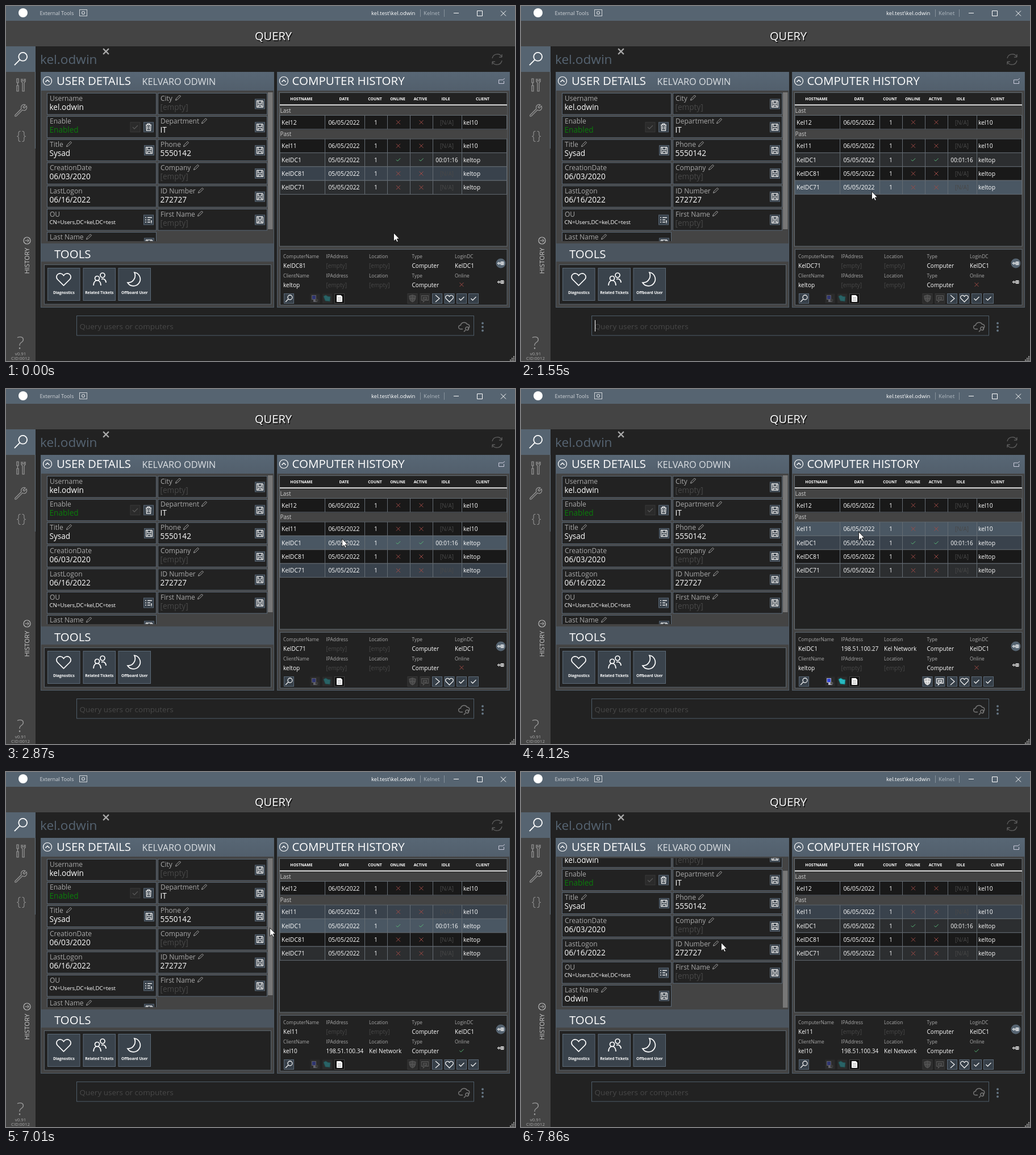
These frames come from a looping animation (896 px wide and 625 px high, 8000 ms). An HTML page:

```html
<!DOCTYPE html>
<html lang="en">
<head>
<meta charset="utf-8">
<title>Query console</title>
<style>
  html, body { margin: 0; width: 100%; height: 100%; overflow: hidden; background: #222; }
  svg { display: block; font-family: "Open Sans", "Noto Sans", sans-serif; white-space: pre; }
</style>
</head>
<body>
<svg id="stage" width="896" height="625" viewBox="0 0 896 625">
  <defs>
    <linearGradient id="head" x2="0" y2="1"><stop stop-color="#586775"/><stop offset="1" stop-color="#525f6c"/></linearGradient>
    <clipPath id="fieldClip"><path d="M62 151.5H471V414H62Z"/></clipPath>
  </defs>
  <g id="base"></g><g id="live"></g>
</svg>
<script>
const LOOP = 8000;
const STEEL = '#566471', EDGE = '#5b6977', GREY = '#444', DARK = '#222', DIM = '#484848', LABEL = '#a9a9a9';
const RED = '#a04a45', GREEN = '#58b877';

// Timelines: [start ms, value...]
const cursorKeys = [[0, 682, 399], [500, 659, 371], [640, 638, 346], [760, 624, 329], [910, 620, 328], [1030, 618, 327],
  [1150, 617, 326], [1990, 614, 320], [2130, 604, 298], [2250, 594, 272], [2370, 591, 263], [4000, 593, 256],
  [4120, 594, 251], [4270, 594, 249], [6890, 520, 262], [7010, 464, 274], [7160, 420, 284], [7290, 375, 290],
  [7440, 352, 293], [7710, 352, 300]];
const hoverKeys = [[0, -1], [910, 4], [2130, 3], [2250, 2], [4000, 1], [6890, 2], [7160, -1]];
const selectKeys = [[0, 3], [1550, 4], [3480, 2], [5350, 1]];
const scrollKeys = [[0, 0], [7440, 12], [7570, 23]];
const caretFlips = [1550, 1840, 2370, 2870, 3480, 3730, 4270, 4640, 5350, 5780, 6340, 6740, 7160, 7860];
const at = (keys, t) => keys.filter(k => k[0] <= t).pop().slice(1);

const rect = (x, y, w, h, fill, stroke = 'none') =>
  `<rect x="${x}" y="${y}" width="${w}" height="${h}" fill="${fill}" stroke="${stroke}"/>`;
const text = (x, y, size, str, fill = '#fff', extra = '') =>
  `<text x="${x}" y="${y}" font-size="${size}" fill="${fill}" ${extra}>${str}</text>`;
const line = (d, stroke, width = 1, fill = 'none') =>
  `<path d="${d}" stroke="${stroke}" stroke-width="${width}" fill="${fill}"/>`;
const circle = (x, y, r, fill, stroke = 'none') =>
  `<circle cx="${x}" cy="${y}" r="${r}" fill="${fill}" stroke="${stroke}" stroke-width="1.2"/>`;
const MID = 'text-anchor="middle"', BOLD = MID + ' font-weight="700"', MEDIUM = 'font-weight="500"';

// Icons are drawn around their centre.
const shapes = {
  heart: 'M0 6L-6 0C-9 -4 -3 -8 0 -3.5C3 -8 9 -4 6 0Z',
  check: 'M-4.5 0L-1.5 3L4.5 -3',
  cross: 'M-3.5 -3.5L3.5 3.5M3.5 -3.5L-3.5 3.5',
  search: 'M-.8 .8L-6 6M-2 -2a4 4 0 1 1 8 0a4 4 0 1 1 -8 0',
  save: 'M-5.5 -5.5H4.5L5.5 -4.5V5.5H-5.5ZM-3 -5V-1H3V-5M-3 5V2H3V5',
  trash: 'M-5 -4H5M-2 -4V-6H2V-4M-4 -4L-3.5 6H3.5L4 -4M-1.5 -2V4M1.5 -2V4',
  list: 'M-6 -4H-4M-2 -4H6M-6 0H-4M-2 0H3M-6 4H-4M-2 4H3M4 2H6M5 1V6',
  pencil: 'M-4.5 4.5L-3.5 1.5L2.5 -4.5L4.5 -2.5L-1.5 3.5Z',
  wrench: 'M-10 8L1 -3C-1 -9 5 -12 8 -10L4 -6L6 -4L10 -8C12 -3 8 2 3 -1L-8 10Q-11 11 -10 8Z',
  tools: 'M-6 -11V-4H-3V-11ZM-4.5 -4V1M-6 1V11H-3V1ZM2 -11V-6L4 -4V11H7V-4L9 -6V-11M4 -11V-7H7V-11',
  prompt: 'M-3 -6L4 0L-3 6',
  shield: 'M0 -6L5.5 -4.5C5.5 2 3 5 0 6C-3 5 -5.5 2 -5.5 -4.5ZM0 -6V6M-5 0H5',
  chat: 'M-6 -5H6V3H0L-3 6V3H-6ZM-3 -2H3V1H-3Z',
  moon: 'M0 -12A12 12 0 1 1 -12 6A12.5 12.5 0 0 0 0 -12Z',
  people: 'M-10 11C-10 -1 3 -1 3 11M-7.5 -1.5a4 4 0 1 1 8 0a4 4 0 1 1 -8 0M2 -7a4 4 0 1 1 8 0a4 4 0 1 1 -8 0M4 0C9 -2 12 2 12 6',
  up: 'M-4 2L0 -2L4 2',
  cloud: 'M-2 5H-6C-11 5 -11 -2 -6 -2C-5 -8 4 -9 6 -4C12 -4 11 4 7 4M3 7L0 10M3 4a3 3 0 1 1 6 0a3 3 0 1 1 -6 0',
  server: 'M-6 0L-3 -2V2ZM-3 0H0M0 -2.5H5V2.5H0ZM0 0H5M2.5 -2.5V2.5'
};
const icon = (name, x, y, color = '#ddd', width = 1, scale = 1, fill = 'none') =>
  `<g transform="translate(${x} ${y}) scale(${scale})">${line(shapes[name], color, width / scale, fill)}</g>`;
const button = (name, x, y, on = true, scale = 1, fill = 'none') =>
  rect(x - 8.5, y - 8.5, 17, 17, on ? '#363f48' : '#2b2b2b', on ? EDGE : '#393939') +
  icon(name, x, y, on ? '#eee' : '#555', 1.3, scale, fill);
const mark = (ok, x, y) => icon(ok ? 'check' : 'cross', x, y, ok ? GREEN : RED, 1, ok ? .8 : 1);

// label, value, pencil x (0 for none), button
const fields = [
  [['Username', 'kel.odwin', 0], ['Enable', 'Enabled', 0, 'trash'], ['Title', 'Sysad', 111, 'save'],
    ['CreationDate', '06/03/2020', 0], ['LastLogon', '06/16/2022', 0],
    ['OU', 'CN=Users,DC=kel,DC=test', 0, 'list'], ['Last Name', 'Odwin', 146, 'save']],
  [['City', '[empty]', 303, 'save'], ['Department', 'IT', 349, 'save'], ['Phone', '5550142', 317, 'save'],
    ['Company', '[empty]', 335, 'save'], ['ID Number', '272727', 343, 'save'], ['First Name', '[empty]', 342, 'save']]
];
const rows = [
  ['Kel12', '06/05/2022', 'kel10', 192.5], ['Kel11', '06/05/2022', 'kel10', 234], ['KelDC1', '05/05/2022', 'keltop', 258.4],
  ['KelDC81', '05/05/2022', 'keltop', 282.8], ['KelDC71', '05/05/2022', 'keltop', 307.2]
];

function fieldBox([label, value, pencil, action], col, i) {
  const x = 72.5 + col * 195, y = 153.5 + i * 40.8;
  const size = value.startsWith('CN') ? 9.7 : 13.6;
  const color = value === '[empty]' ? DIM : value === 'Enabled' ? '#0a7d0a' : '#fff';
  const actionX = action === 'save' ? (col ? 447 : 252) : 251;
  return rect(x, y, 192, 37.5, DARK, EDGE) + text(x + 4.5, y + 13, 12, label, LABEL) +
    text(x + 4, y + (size < 10 ? 26 : 29), size, value, color) +
    (pencil ? icon('pencil', pencil, y + 8, LABEL) : '') +
    (label === 'Enable' ? button('check', 227.5, y + 19, false) : '') +
    (action ? button(action, actionX, y + 19) : '');
}

function tableRow([host, date, client, y], i, hover, selected) {
  const fill = i === hover ? '#4a5763' : i === selected ? '#39424c' : i === 2 || i === 4 ? '#2c2e30' : '#191919';
  const mid = y + 12.2, base = mid + 4, online = i === 2;
  return rect(482, y, 399.5, 24.4, fill, '#646c73') +
    line([561, 631, 671, 711, 751, 802].map(x => `M${x}.5 ${y}v24.4`).join(''), '#646c73') +
    text(485, base, 10.4, host, '#fff', MEDIUM) + text(595, base, 10.4, date, '#fff', MID + MEDIUM) +
    text(651, base, 10.4, '1', '#fff', MID + MEDIUM) +
    mark(online, 690.5, mid) + mark(online, 731, mid) +
    text(776, base, 10, online ? '00:01:16' : '[N/A]', online ? '#fff' : DIM, MID + MEDIUM) +
    text(805, base, 10.4, client, '#fff', MEDIUM);
}

function details(selected, loading) {
  const reachable = selected === 2, clientUp = selected === 1, empty = loading ? '' : '[empty]';
  const row = (y, labels, values) => labels.map((label, i) => {
    const x = [488, 563.5, 639, 714.5, 790][i], blank = values[i] === '[empty]';
    return text(x, y, 8.4, label, LABEL) + text(x, y + 17, 10.1, values[i], blank ? DIM : '#fff', blank ? '' : MEDIUM);
  }).join('');
  const [host, , client] = rows[selected];
  return row(444, ['ComputerName', 'IPAddress', 'Location', 'Type', 'LoginDC'],
      [host, reachable ? '198.51.100.27' : empty, reachable ? 'Kel Network' : empty, 'Computer', 'KelDC1']) +
    row(477.5, ['ClientName', 'IPAddress', 'Location', 'Type', 'Online'],
      [client, clientUp ? '198.51.100.34' : '[empty]', clientUp ? 'Kel Network' : '[empty]', 'Computer', '']) +
    mark(clientUp, 802, 490.5) +
    rect(535.5, 506.5, 17, 17, '#2b2b2b') + rect(557, 506.5, 17, 17, '#2b2b2b') +
    `<g opacity="${reachable ? 1 : .4}">` + rect(538.5, 509.5, 7, 7, '#3546d8', '#aab') + rect(541, 517, 7, 4, '#bbc') +
    circle(547, 518, 2.5, '#555') + line('M559 511l4 -2 3 2 5 1 -1 8 -8 -1Z', '#177', 1, '#28b8c0') + '</g>' +
    button('shield', 715.5, 515, reachable, 1, reachable ? '#bbb' : '#444') + button('chat', 737.5, 515, reachable);
}

function buildBase() {
  const header = (x, w) => rect(x, 116.5, w, 414, GREY, '#4f5c68') + rect(x, 116, w, 33, 'url(#head)') +
    circle(x + 11.5, 132, 7.5, 'none', '#fff') + icon('up', x + 11.5, 132, '#fff', 1.4, .9);
  const tile = (x, name, label, scale) => rect(x, 461.5, 56.5, 57, '#3a434c', EDGE) +
    icon(name, x + 28, 481, '#fff', 1.7, scale) + text(x + 28.3, 507, 6.6, label, '#fff', BOLD);
  const heads = { HOSTNAME: 520, DATE: 595, COUNT: 649.5, ONLINE: 689.5, ACTIVE: 729.5, IDLE: 774, CLIENT: 839 };
  const group = (y, name) => rect(482, y, 400, 15.5, GREY) + text(482.5, y + 11.3, 10, name, '#ccc');
  return rect(0, 0, 896, 625, DARK) + rect(0, 26, 896, 45, GREY) + rect(0, 0, 896, 26, STEEL) +
    circle(30, 12, 8, '#fff') + text(59.5, 16, 9.2, 'External Tools', '#d0d4d8') +
    rect(129.5, 6.5, 13, 11, 'none', '#d0d4d8') + circle(136, 12, 2.5, 'none', '#d0d4d8') +
    text(643, 16, 9.5, 'kel.test\\kel.odwin') + text(735, 16, 9.6, 'Kelnet', '#aeb7bf') +
    line('M729.5 6V19M771.5 6V19', '#87929c') + line('M788 12.5H797M829.5 8.5H838.5V17.5H829.5ZM871 8.5L880 17.5M880 8.5L871 17.5', '#fff') +
    text(472, 62, 20.1, 'QUERY', '#111', MID) + text(470.5, 60.3, 20.1, 'QUERY', '#fff', MID) +
    // Sidebar
    rect(0, 71, 52, 554, GREY) + rect(0, 71, 52, 45, STEEL) + rect(51, 116, 1, 135, '#66747f') +
    icon('search', 26, 93, '#fff', 1.8, 1.85) + icon('tools', 25, 139, '#999', 1.2) + icon('wrench', 26, 184, '#999', 1.2) +
    text(26, 236, 22, '{ }', '#999', MID + ' font-weight="300" letter-spacing="-2"') +
    circle(37, 413, 6, 'none', '#bbb') + line('M33.5 413H40M37.5 410L40.5 413L37.5 416', '#bbb') +
    text(0, 0, 11.3, 'HISTORY', '#ccc', 'transform="translate(40.5 471.5) rotate(-90)"') +
    text(25.5, 604, 32, '?', '#999', MID + ' font-weight="300"') +
    text(25.5, 615, 7.9, 'v0.91', '#aaa', MID) + text(25.5, 623, 7.9, 'CID:0012', '#aaa', MID) +
    text(60, 101.5, 22.6, 'kel.odwin', '#566472') +
    icon('cross', 176, 80, '#aaa', 2.2, 1.4) +
    line('M856 92A9 9 0 0 1 873 90V85M873 90H868M873 96A9 9 0 0 1 856 98V103M856 98H861', '#5a5a5a', 1.4) +
    // Left panel
    header(61.5, 410) + text(89, 139.3, 20.3, 'USER DETAILS') + text(239.5, 139, 16.3, 'KELVARO ODWIN', '#dde1e5') +
    rect(62, 418, 409, 32, '#4b555f') + text(85, 443.5, 20.4, 'TOOLS') + rect(67.5, 455.5, 399, 69.5, DARK, '#59636c') +
    tile(73.5, 'heart', 'Diagnostics', 1.85) + tile(136, 'people', 'Related Tickets', 1) + tile(198, 'moon', 'Offboard User', 1) +
    // Right panel
    header(477.5, 409) + text(503.5, 139.3, 20.5, 'COMPUTER HISTORY') +
    line('M874 130H867.5V136.5H876.5V132M874 130.5L878 127.5', '#ccd') + rect(481.5, 152.5, 400.5, 270.5, DARK, '#646c73') +
    Object.entries(heads).map(([name, x]) => text(x, 165.5, 6.9, name, '#fff', BOLD)).join('') +
    rect(482, 173, 400, 2.5, '#c8c8c8') + group(177, 'Last') + group(218, 'Past') +
    rect(482.5, 428.5, 399.5, 98, DARK, '#59636c') +
    circle(871, 453, 8.5, STEEL) + icon('server', 871, 453, '#fff') + icon('server', 871, 486, '#fff') +
    button('search', 498, 515) + rect(578.5, 506.5, 17, 17, '#111', '#444') + line('M582.5 509.5H589.5L591.5 511.5V520.5H582.5Z', '#fff', 1, '#fff') +
    line('M584 513.5H590M584 516H590M584 518.5H590', '#aaa') + button('prompt', 759, 515) + button('heart', 780.5, 515) +
    button('check', 802, 515) + button('check', 823, 515) +
    // Query bar
    rect(124.5, 545.5, 699, 34.5, DARK, '#4f5d69') + text(129.5, 569, 13.5, 'Query users or computers', DIM) +
    icon('cloud', 806, 564, '#777', 1.5, .95) + [558.5, 565, 571.5].map(y => circle(839, y, 1.9, '#667684')).join('') +
    line('M893 617.5h2M890 620.5h2m1 0h2M887 623.5h2m1 0h2m1 0h2', '#aaa', 2);
}

function buildLive(t) {
  const [x, y] = at(cursorKeys, t), [hover] = at(hoverKeys, t), [selected] = at(selectKeys, t), [scroll] = at(scrollKeys, t);
  const caretOn = caretFlips.filter(f => f <= t).length % 2;
  return `<g clip-path="url(#fieldClip)"><g transform="translate(0 ${-scroll})">` +
    fields.map((column, col) => column.map((f, i) => fieldBox(f, col, i)).join('')).join('') + '</g></g>' +
    rect(461, 152 + scroll * .95, 8.5, 241, '#777') +
    rows.map((row, i) => tableRow(row, i, hover, selected)).join('') +
    details(selected, t >= 5350 && t < 5470) +
    (caretOn ? rect(130, 553, 1, 20, '#fff') : '') +
    `<g transform="translate(${x} ${y})">` +
    line('M.5 .5V15L3.9 11.9L6.2 16.5L8.4 15.5L6.2 11H10.5Z', '#000', .8, '#fff') + '</g>';
}

const base = document.getElementById('base'), live = document.getElementById('live');
base.innerHTML = buildBase();
let shown = '';
function tick() {
  const markup = buildLive(performance.now() % LOOP);
  if (markup !== shown) live.innerHTML = shown = markup;
  requestAnimationFrame(tick);
}
tick();
</script>
</body>
</html>
```
